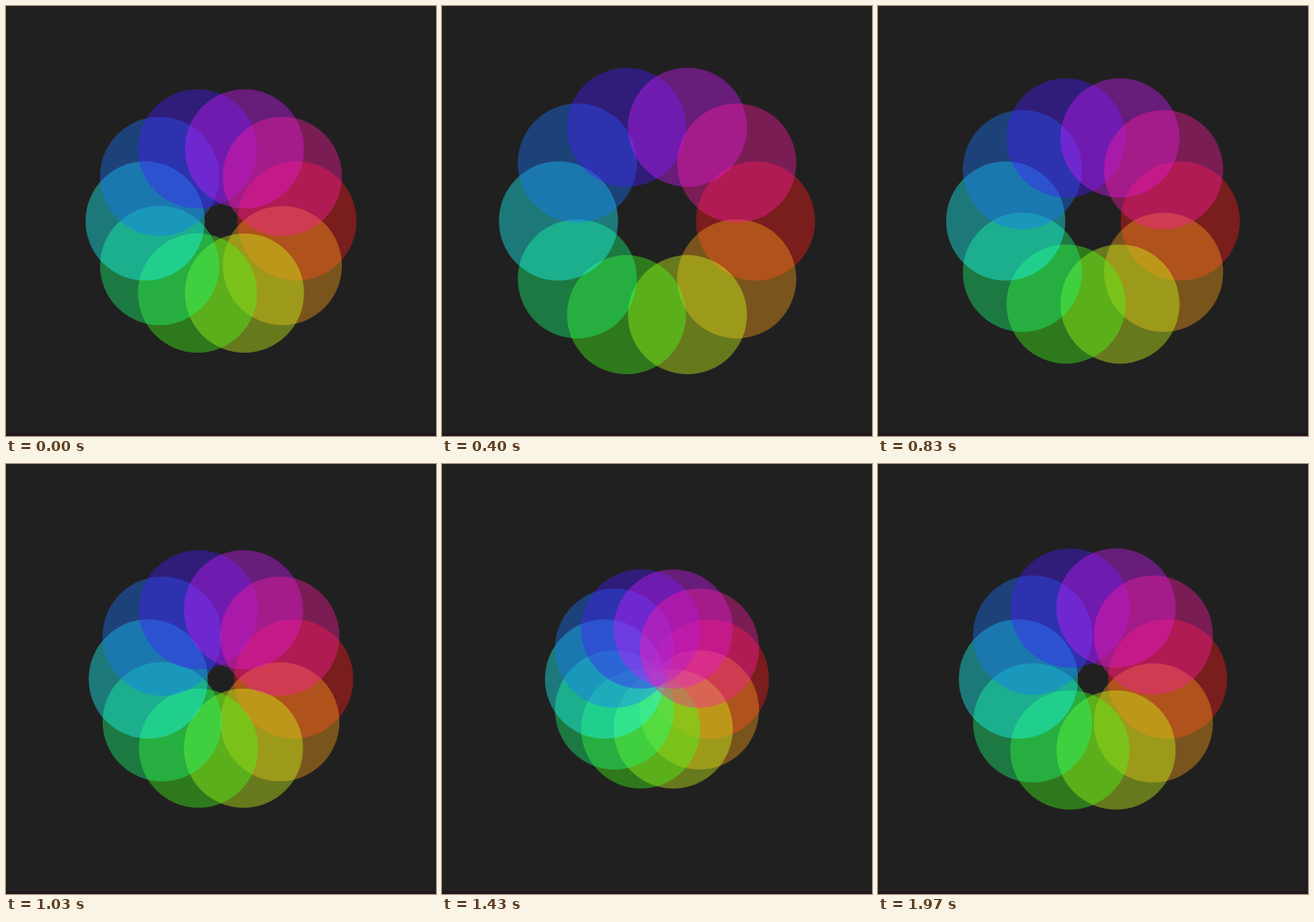
An HTML page with a canvas that plays this animation: 480 by 480 pixels, repeating every 2.01 s.

```html
<!DOCTYPE html>
<html>
<head>
<meta charset="utf-8">
<style>
  html, body { margin: 0; width: 100%; height: 100%; overflow: hidden; background: #202020; }
  canvas { display: block; }
</style>
</head>
<body>
<canvas id="stage" width="480" height="480"></canvas>
<script>
const ctx = document.getElementById('stage').getContext('2d');
const LOOP = 2010, COUNT = 10, RADIUS = 66.5;

// 30 steps per second, with delays rounded to 10 ms
function stepAt(ms) {
  const tick = Math.floor(ms % LOOP / 10);
  return Math.min(59, Math.floor((tick * 3 + 1) / 10));
}

function draw(step) {
  const spread = 84.7 + 26.5 * Math.sin(step * 2 * Math.PI / 59.5);
  ctx.fillStyle = '#202020';
  ctx.fillRect(0, 0, 480, 480);
  ctx.fillStyle = '#20161b';
  ctx.fillRect(0, 477, 480, 3);
  for (let i = 0; i < COUNT; i++) {
    const angle = i / COUNT * 2 * Math.PI;
    ctx.fillStyle = `hsla(${i * 360 / COUNT}, 100%, 55%, 0.4)`;
    ctx.beginPath();
    ctx.arc(240 + spread * Math.cos(angle), 240 + spread * Math.sin(angle), RADIUS, 0, 2 * Math.PI);
    ctx.fill();
  }
}

const start = performance.now();
function frame() {
  draw(stepAt(performance.now() - start));
  requestAnimationFrame(frame);
}
frame();
</script>
</body>
</html>
```
